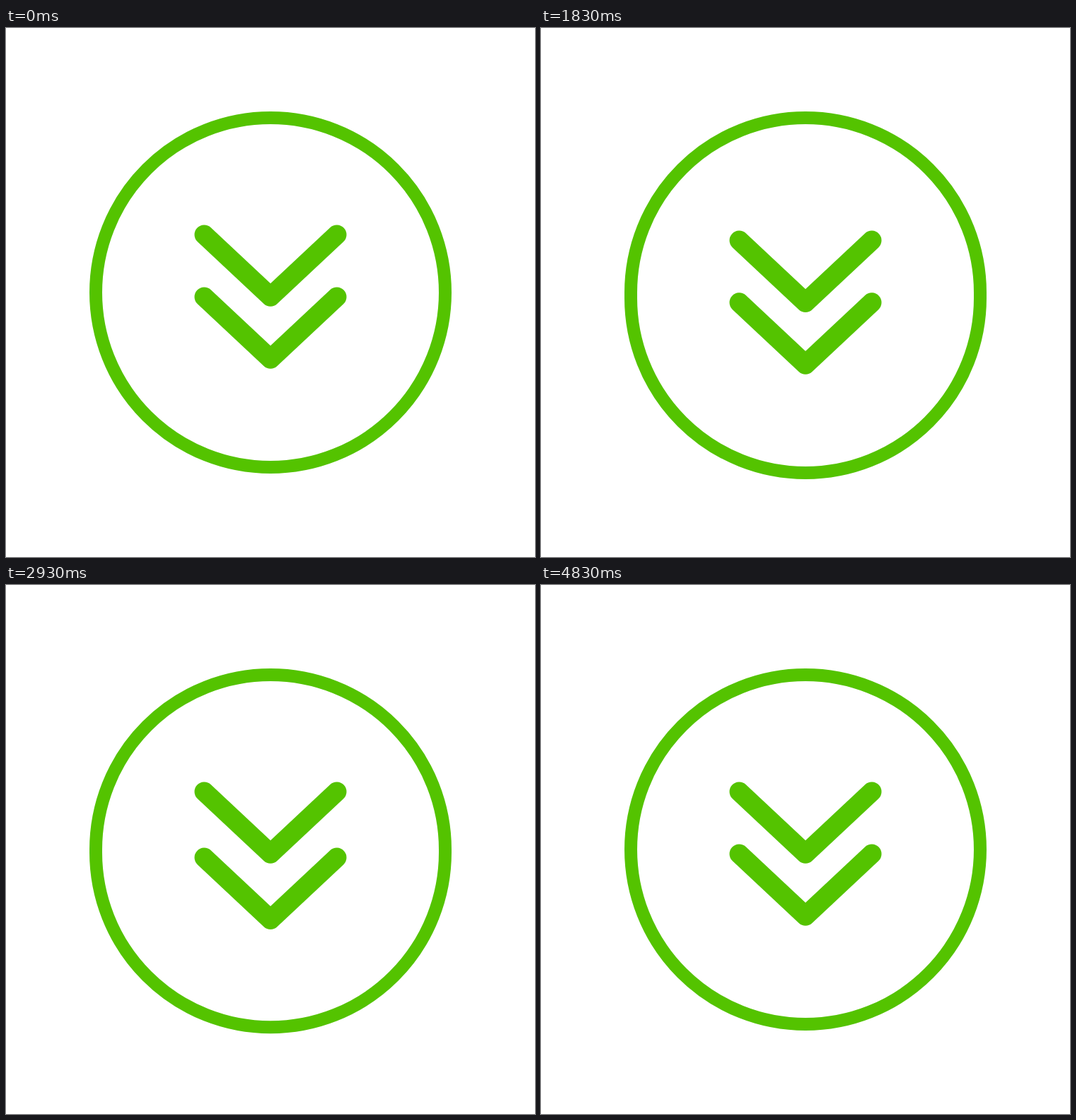
An HTML page that plays this animation: 748 px wide and 748 px high, repeating every 5110 ms.

```html
<!DOCTYPE html>
<html lang="en">
<head>
<meta charset="utf-8">
<title>Scroll down</title>
<style>
  html, body { margin: 0; width: 100%; height: 100%; overflow: hidden; background: #fff; }
  svg { display: block; width: 100%; height: 100%; fill: none; stroke: #54c300; }
  path { stroke-width: 27.6; stroke-linecap: round; stroke-linejoin: round; }
</style>
</head>
<body>
<svg viewBox="0 0 748 748">
  <rect id="ring" x="127" y="127" width="494" height="494" rx="247" stroke-width="18"/>
  <path id="upper" d="M280.3 292.2 374 380 467.7 292.2"/>
  <path id="lower" d="M280.3 380.2 374 468 467.7 380.2"/>
</svg>
<script>
const LOOP = 5110, CYCLE = 34; // ms, ticks of 50 ms
const [ring, upper, lower] = ['ring', 'upper', 'lower'].map(id => document.getElementById(id));

// Cubic ease through (x1, 0) and (x2, 1)
function ease(t, x1, x2) {
  if (t <= 0) return 0;
  if (t >= 1) return 1;
  let lo = 0, hi = 1, s;
  for (let i = 0; i < 24; i++) {
    s = (lo + hi) / 2;
    const x = 3 * (1 - s) ** 2 * s * x1 + 3 * (1 - s) * s * s * x2 + s ** 3;
    if (x < t) lo = s; else hi = s;
  }
  return s * s * (3 - 2 * s);
}

// Sinks by `depth` until tick `peak`, then rises back until tick `end`
function sink(tick, { depth, peak, end, down, up }) {
  return depth * (tick < peak
    ? ease(tick / peak, ...down)
    : 1 - ease((tick - peak) / (end - peak), ...up));
}

const upperMove = { depth: 52, peak: 12, end: 24, down: [1 / 3, 2 / 3], up: [1 / 3, 2 / 3] };
const lowerMove = { depth: 51.2, peak: 13.3, end: 29, down: [0.3, 0.6], up: [0.3, 0.52] };
const ringMove = { ...lowerMove, up: [0.3, 0.46] };

function draw() {
  const time = performance.now() % LOOP;
  // Ticks alternate between 30 and 70 ms
  const tick = (2 * Math.floor(time / 100) + (time % 100 >= 30 ? 1 : 0)) % CYCLE;
  const rest = time >= LOOP - 280;
  const at = move => rest ? 0 : sink(tick, move);
  ring.setAttribute('height', 494 + at(ringMove));
  upper.setAttribute('transform', `translate(0 ${at(upperMove)})`);
  lower.setAttribute('transform', `translate(0 ${at(lowerMove)})`);
  requestAnimationFrame(draw);
}
draw();
</script>
</body>
</html>
```
